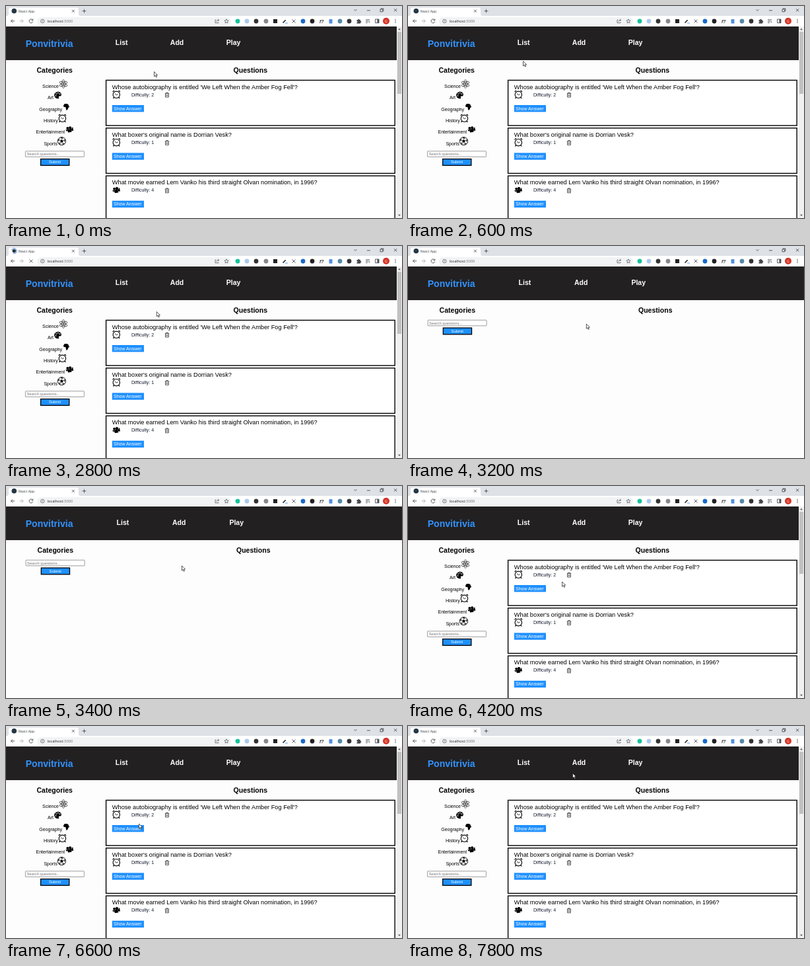
These frames come from a looping animation (600 by 321 pixels, 8000 ms). An HTML page:

```html
<!DOCTYPE html>
<html lang="en">
<head>
<meta charset="utf-8">
<title>Trivia page</title>
<style>
  html, body { margin: 0; width: 100%; height: 100%; overflow: hidden; background: #fff; }
  svg { display: block; width: 600px; height: 321px; }
  text { font-family: "Liberation Sans", Arial, sans-serif; font-size: 7.03px; white-space: pre; }
  .ui { font-family: "Open Sans", "Noto Sans", sans-serif; }
  .h1 { font-size: 14.05px; font-weight: bold; }
  .h2 { font-size: 10.54px; font-weight: bold; }
  .question { font-size: 9.22px; }
  .field { font-size: 5.86px; }
  .line { fill: none; stroke: #4a4d51; stroke-width: .9; }
</style>
</head>
<body>
<svg id="stage" viewBox="0 0 600 321"></svg>
<script>
const LOOP = 8000, STEP = 200;
const BLUE = '#1e90ff';

const text = (x, y, str, cls = '', fill = '#000') =>
  `<text x="${x}" y="${y}" class="${cls}" fill="${fill}">${str}</text>`;
const rect = (x, y, w, h, fill, extra = '') =>
  `<rect x="${x}" y="${y}" width="${w}" height="${h}" fill="${fill}" ${extra}/>`;
const circle = (x, y, r, fill, extra = '') =>
  `<circle cx="${x}" cy="${y}" r="${r}" fill="${fill}" ${extra}/>`;
const path = (d, extra = '') => `<path d="${d}" ${extra}/>`;
const line = (d, extra = '') => path(d, `class="line" ${extra}`);
const at = (x, y, body, id = '') => `<g id="${id}" transform="translate(${x} ${y})">${body}</g>`;
const spread = (n, draw) => Array.from({ length: n }, (_, i) => draw(i * 360 / n)).join('');

// Icons are drawn around their own centre.
const icons = {
  atom: spread(3, a => `<ellipse rx="6.3" ry="2.5" fill="none" stroke="#333" stroke-width=".75" transform="rotate(${a / 2 + 30})"/>`)
    + circle(0, 0, 1.3, '#333'),
  palette: path('M-5.3 1C-6-3-2-5.5 1-5.2S6-2 5.2 .3S1.5 .5 1.3 2.2S2.7 5.4 0 5.2S-5-1-5.3 1Z')
    + path('M-5.3 0C-5 3.5-3 5.3 0 5.2L1 0Z')
    + [[-3, .8], [-2.4, -2], [.3, -3.4], [3, -1.8]].map(([x, y]) => circle(x, y, .85, '#fff')).join(''),
  africa: path('M-3-4.6L1-4.8L3-3.5L3.6-1L5-.8L2.6 1.8L2.4 3L.9 5H0L-.8 2.4L-1.1 .3L-3.6 .2L-4.7-1.6Z'),
  clock: path('M-5.8-3.4A2.2 2.2 0 0 1-2.4-5.8ZM5.8-3.4A2.2 2.2 0 0 0 2.4-5.8ZM-4.5 4L-5.4 6H-4L-3 5ZM4.5 4L5.4 6H4L3 5Z')
    + circle(0, .3, 5.2, '#fff', 'stroke="#000" stroke-width="1.1"')
    + path('M-2.4-1.3L0 .7L2.3-.3', 'fill="none" stroke="#000" stroke-width=".8"'),
  camera: circle(-3.2, -2, 1.9, '#000') + circle(.7, -2.6, 2.1, '#000')
    + path('M-3.8 0L2.2-1.2L3 3.7L-2.4 4.5ZM2.4-.5L4.6-4L5.7 1.8L3 2Z') + path('M-6 .4L-4-.2L-3.4 2.2L-5 2.4Z'),
  ball: circle(0, 0, 6.1, '#fff', 'stroke="#000" stroke-width=".9"')
    + path('M0-2.4L2.3-.7L1.4 2H-1.4L-2.3-.7Z')
    + spread(5, a => path('M0-2V-4.5M0-4.5L2.6-3.6', `stroke="#000" stroke-width=".6" fill="none" transform="rotate(${a})"`)
      + path('M-1.8-5.7L0-4.1L1.8-5.7Z', `transform="rotate(${a})"`)),
  trash: path('M-3.2-2.3H3.2M-1.2-2.5V-3.5H1.2V-2.5M-2.4-2V3.3H2.4V-2M-.9-.8V2M.9-.8V2',
    'fill="none" stroke="#222" stroke-width=".75"'),
};

function browser() {
  const badges = [[351, '#15c39a'], [365, '#a9c8f2'], [379, '#333'], [394, '#85888c'], [450, '#1769c8'],
    [464, '#222'], [506, '#5688a6'], [520, '#333']].map(([x, fill]) => circle(x, 23, 3.4, fill)).join('');
  return rect(0, 0, 600, 16, '#dee1e6') + rect(0, 15, 600, 16, '#fff')
    + path('M1 15Q4 15 4 12V6Q4 2.5 7 2.5H107Q110 2.5 110 6V12Q110 15 113 15Z', 'fill="#fff"')
    + `<g id="favicon">${circle(12.3, 7.5, 3.8, '#243746')}</g>`
    + `<g id="spinner">${circle(12.3, 7.5, 2.7, '#243746')}${line('M12.3 3.6A3.9 3.9 0 1 1 8.4 7.5', 'id="arc" style="stroke:#4b83d8"')}</g>`
    + text(19, 9.6, 'React App', 'ui', '#3c4043').replace('<text', '<text style="font-size:5.2px"')
    + line('M100 5.7l3.8 3.8m0-3.8l-3.8 3.8M118.5 4.8v5.6m-2.8-2.8h5.6')
    + line('M527.5 5.2l2 2l2-2M547 6.8h5M567 5h3.7v3.7h-3.7zM568.2 5v-1.2h3.7v3.7h-1.2M588 4.2l4.2 4.2m0-4.2l-4.2 4.2')
    + line('M13.2 22.8H7.5m2.7-2.7l-2.7 2.7l2.7 2.7')
    + line('M20.5 22.8h5.7m-2.7-2.7l2.7 2.7l-2.7 2.7', 'style="stroke:#aaacb0"')
    + line('M40.4 21.2A2.9 2.9 0 1 0 40.8 23.5M40.8 19.5v2.2h-2.2', 'id="reload"')
    + line('M35.6 20.4l4.8 4.8m0-4.8l-4.8 4.8', 'id="stop"')
    + rect(47, 17, 294, 12, '#f1f3f4', 'rx="6"')
    + line('M58 22.9a2.7 2.7 0 1 0-5.4 0a2.7 2.7 0 1 0 5.4 0M55.3 22.6v1.7M55.3 21.1v.8', 'style="stroke-width:.7"')
    + text(62.5, 25, 'localhost<tspan fill="#6b6f74">:3000</tspan>', 'ui', '#202124').replace('<text', '<text style="font-size:5.75px"')
    + line('M318.5 21h-1.5v4.6h5v-1.4M319 23.8q.2-2.5 3.5-2.5m-1.5-1.5l1.7 1.5l-1.7 1.5', 'style="stroke-width:.7"')
    + line('M334 19.8l.9 2.1l2.3.2l-1.8 1.5l.6 2.2l-2-1.2l-2 1.2l.6-2.2l-1.8-1.5l2.3-.2z', 'style="stroke-width:.7"')
    + badges + rect(405, 20, 6, 6, '#222') + rect(489.5, 20, 5, 6.5, '#528fe0')
    + line('M419.5 25.5l4.2-4.2', 'style="stroke:#222;stroke-width:1.6"') + rect(423, 24.6, 4, 2.6, '#b8d6ed')
    + line('M433.5 20.5l5 5m0-5l-5 5')
    + text(475, 25.5, '<tspan font-style="italic" font-weight="bold">f?</tspan>', '', '#333')
    + path('M531.5 21h1.7a1.2 1.2 0 0 1 2.4 0h1.5v1.7a1.2 1.2 0 0 1 0 2.4v1.4h-5.6v-1.8a1 1 0 0 0 0-2z', 'fill="#45484c"')
    + line('M545 20.8h6M545 23h4M545 25.2h3M550.3 22.5v3')
    + line('M559.5 20h5.5v5.6h-5.5z') + rect(562.5, 20, 2.5, 5.6, '#4a4d51')
    + circle(576, 22.8, 5, '#d33426') + text(574, 24.7, 'G', 'ui', '#fff').replace('<text', '<text style="font-size:5px"')
    + [20.5, 22.8, 25.1].map(y => circle(590, y, .75, '#4a4d51')).join('');
}

const header = (width, links) => rect(0, 31, width, 51, '#222021')
  + text(29.7, 62.2, 'Ponvitrivia', 'h1', '#3193ff')
  + ['List', 'Add', 'Play'].map((s, i) => text(links[i], 58.8, s, 'h2', '#fff')).join('');

const search = (x, y) => at(x, y,
  rect(.2, .2, 89, 8.6, '#fff', 'stroke="#767676" stroke-width=".7" rx=".6"')
  + text(2.2, 6.5, 'Search questions...', 'field', '#757575')
  + rect(23.4, 12, 43.2, 9.8, BLUE, 'stroke="#000" stroke-width="1.3"')
  + text(35.7, 18.9, 'Submit', 'field', '#fff'));

const card = ([question, icon, level], i) => at(0, i * 72.4,
  rect(151.6, 112.4, 437.6, 68.6, '#fff', 'stroke="#000" stroke-width="1.4"')
  + text(160.8, 125.6, question, 'question')
  + at(167.3, 134, icons[icon])
  + text(190, 136.7, 'Difficulty: ' + level, '', '#111a2c')
  + at(244, 134.7, icons.trash)
  + rect(160.8, 150, 48.2, 10.4, BLUE)
  + text(163, 157.7, 'Show Answer', '', '#fff'));

function loadedPage() {
  const categories = [['Science', 55, 124, 'atom', 87, 118], ['Art', 63, 141, 'palette', 78.5, 135],
    ['Geography', 50.3, 159, 'africa', 91.5, 152.8], ['History', 57, 176.3, 'clock', 85.4, 170],
    ['Entertainment', 45.5, 193, 'camera', 96.5, 187], ['Sports', 57.4, 210.7, 'ball', 84.4, 204.6]];
  const questions = [["Whose autobiography is entitled 'We Left When the Amber Fog Fell'?", 'clock', 2],
    ["What boxer's original name is Dorrian Vesk?", 'clock', 1],
    ['What movie earned Lem Vanko his third straight Olvan nomination, in 1996?', 'camera', 4]];
  return header(592, [165.8, 248.8, 333.7])
    + text(46.5, 100.7, 'Categories', 'h2') + text(344.6, 100.7, 'Questions', 'h2')
    + categories.map(([name, x, y, icon, ix, iy]) => text(x, y, name) + at(ix, iy, icons[icon])).join('')
    + search(29.2, 219.6) + questions.map(card).join('')
    + rect(592, 31, 8, 290, '#f1f1f1') + rect(593, 39, 6, 94, '#c1c1c1')
    + path('M594 36.2h4l-2-2.4zM594 315.8h4l-2 2.4z', 'fill="#606060"');
}

const blankPage = () => header(600, [167.6, 252, 338.4])
  + text(47.6, 100.7, 'Categories', 'h2') + text(349, 100.7, 'Questions', 'h2') + search(29.9, 112);

document.getElementById('stage').innerHTML = rect(0, 0, 600, 321, '#fefdfe') + browser()
  + `<g id="loaded">${loadedPage()}</g><g id="blank">${blankPage()}</g>`
  + at(0, 0, path('M0 0V7.2L1.7 5.7L2.9 8.4L4.1 7.8L2.9 5.2H5.1Z',
    'id="arrow" fill="#fff" stroke="#111" stroke-width=".7"')
    + path('M-1.5-4Q0-4 0-3V3Q0 4-1.5 4M1.5-4Q0-4 0-3V3Q0 4 1.5 4',
      'id="beam" fill="none" stroke="#222" stroke-width=".8"'), 'cursor');

// Pointer stops: time, x, y
const stops = [[0, 224.5, 99.5], [200, 224.5, 99.5], [1400, 31.8, 38], [1800, 37, 22], [2200, 37, 22.5],
  [2800, 228.3, 99.5], [3200, 270.3, 118], [4200, 233.6, 145], [5200, 196, 157], [6400, 196, 157],
  [7400, 249.5, 71.6], [LOOP, 249.5, 71.6]];

function pointer(t) {
  const i = stops.findIndex(s => s[0] > t);
  const [t0, x0, y0] = stops[i - 1], [t1, x1, y1] = stops[i];
  const p = (t - t0) / (t1 - t0), k = p * p * (3 - 2 * p);
  return [x0 + (x1 - x0) * k, y0 + (y1 - y0) * k];
}

const $ = id => document.getElementById(id);
const show = (id, on) => { $(id).style.display = on ? '' : 'none'; };

function render(now) {
  const t = Math.floor(now % LOOP / STEP) * STEP;
  const loading = t >= 2200 && t < 3200, blank = t >= 3200 && t < 3600;
  show('loaded', !blank);
  show('blank', blank);
  show('favicon', !loading);
  show('spinner', loading);
  show('reload', !loading);
  show('stop', loading);
  $('arc').setAttribute('transform', `rotate(${t * .36} 12.3 7.5)`);

  const [x, y] = pointer(t);
  const overButton = x > 161 && x < 209 && y > 150 && y < 160;
  show('arrow', !overButton);
  show('beam', overButton);
  $('cursor').setAttribute('transform', `translate(${x} ${y})`);
}

const start = performance.now();
function tick() {
  render(performance.now() - start);
  requestAnimationFrame(tick);
}
tick();
</script>
</body>
</html>
```
